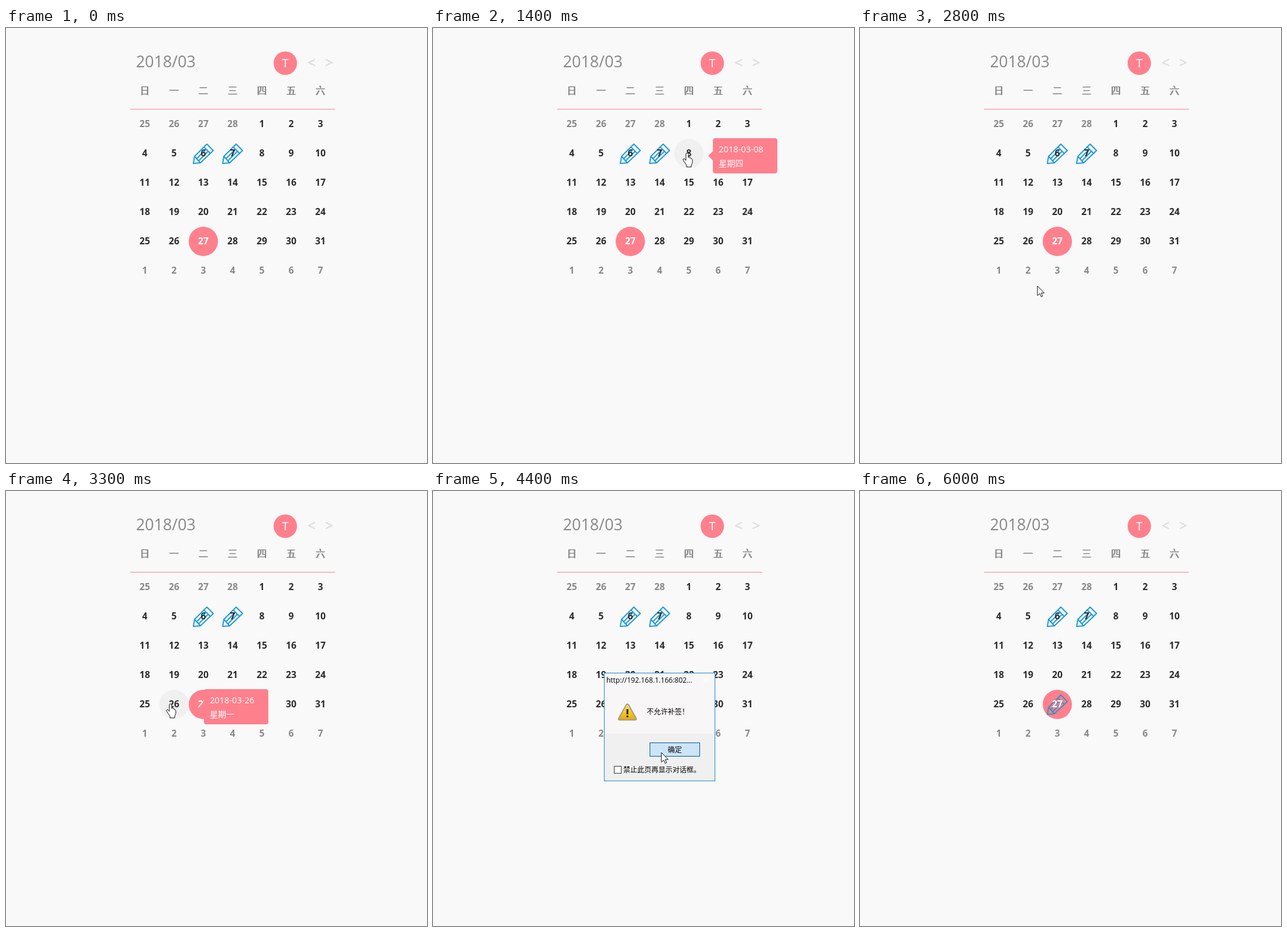
Recreate the animation shown at these times as an HTML page with a canvas. Size 719 by 742 pixels, loop 9.5 s.

```html
<!DOCTYPE html>
<html lang="zh">
<head>
<meta charset="utf-8">
<style>
html, body { margin: 0; width: 100%; height: 100%; overflow: hidden; background: #f9f9f9; }
canvas { display: block; }
</style>
</head>
<body>
<canvas id="stage" width="719" height="742"></canvas>
<script>
const ctx = document.getElementById('stage').getContext('2d');
const LOOP = 9500, STEP = 100;
const PINK = '#ff808d', GREY = '#888', DARK = '#2d2a2a';
const LATIN = '"Open Sans", "Noto Sans CJK SC", sans-serif';
const CJK = '"Noto Sans CJK SC", "Noto Sans CJK", sans-serif';
const DAYS = '日一二三四五六';
const TODAY = 30;

// Pointer path: time, x, y
const PATH = [
  [500, 694, 324], [800, 500, 272], [900, 445, 255], [1000, 428, 181],
  [1400, 434, 213], [1500, 434, 213], [1700, 430, 330], [1800, 430, 330],
  [2200, 408, 457], [2400, 408, 457], [2800, 303, 440], [3000, 285, 410],
  [3300, 281, 363], [3800, 283, 364], [4300, 390, 446], [4500, 390, 446],
  [4600, 355, 300], [4700, 362, 217], [4800, 355, 340], [5200, 351, 359],
  [5500, 351, 359], [5600, 400, 365], [5700, 490, 355], [5900, 708, 207]
];

// Hovered cells: from, to, cell index
const HOVERS = [
  [800, 900, 18], [900, 1000, 18 - 1], [1000, 2400, 11], [2900, 3200, 36],
  [3200, 4400, 29], [4800, 5600, TODAY], [5600, 5700, 31], [5700, 5800, 33]
];

const HAND = new Path2D('M-2 13V2q0-2 2-2t2 2v6q0-1 1.2-1t1.2 1v1q.2-.8 1.2-.7t1.2 1.2v1q.2-.5 1-.3t1.2 1.5v5l-2 4.3v3h-8v-3l-5.5-8q-1.2-2.5 .5-3t3 2z');
const ARROW = new Path2D('M0 0V16.5l4-3.5 2.5 5.5 2.4-1-2.4-5.5h5.2z');
const PENCIL = new Path2D('M-17 17l2-12L6-16 17-5-5 16zM-15 5L-5 16M1-11L12 0M-11.5 9L4.5-7M-8 12.5L8.5-4');
const TRIANGLE = new Path2D('M14.2 1.5q1.8-2 3.6 0L31 25q1 2.5-2 2.5H3q-3 0-2-2.5z');

function text(str, x, y, size, color, { align = 'left', weight = 400, family = LATIN } = {}) {
  ctx.font = `${weight} ${size}px ${family}`;
  ctx.textAlign = align;
  ctx.fillStyle = color;
  ctx.fillText(str, x, y);
}

function rect(x, y, w, h, fill, stroke, line = 1) {
  ctx.fillStyle = fill;
  ctx.fillRect(x, y, w, h);
  if (!stroke) return;
  ctx.strokeStyle = stroke;
  ctx.lineWidth = line;
  ctx.strokeRect(x + line / 2, y + line / 2, w - line, h - line);
}

function disc(x, y, r, fill) {
  ctx.fillStyle = fill;
  ctx.beginPath();
  ctx.arc(x, y, r, 0, Math.PI * 2);
  ctx.fill();
}

function shape(path, x, y, fill, stroke, line = 1) {
  ctx.save();
  ctx.translate(x, y);
  ctx.lineWidth = line;
  ctx.lineJoin = 'round';
  ctx.fillStyle = fill;
  ctx.strokeStyle = stroke;
  if (fill) ctx.fill(path);
  ctx.stroke(path);
  ctx.restore();
}

const center = i => [237 + i % 7 * 50, 164 + Math.floor(i / 7) * 50];
const dateOf = i => new Date(2018, 1, 25 + i);

function drawHeader() {
  text('2018/03', 222, 67, 26.8, GREY);
  disc(477, 60, 20, PINK);
  text('T', 477, 67, 20, '#fff', { align: 'center' });
  for (const [sign, x] of [['<', 522], ['>', 552]])
    text(sign, x, 67.5, 25, '#ddd', { align: 'center', weight: 600 });
  [...DAYS].forEach((day, i) => {
    // Doubled glyphs thicken only the vertical strokes
    for (const dx of [-.4, .4])
      text(day, 237 + i * 50 + dx, 113, 16.5, GREY, { align: 'center', family: CJK });
  });
  rect(212, 138, 350, 1, PINK);
}

function drawCells(t, hovered) {
  for (let i = 0; i < 42; i++) {
    const [x, y] = center(i), date = dateOf(i);
    if (i === TODAY) disc(x, y, 25, PINK);
    else if (i === hovered) disc(x, y, 25, '#f0f0f0');
    if (i === 9 || i === 10 || (i === TODAY && t >= 5100))
      shape(PENCIL, x, y, null, i === TODAY ? '#3f8fbf' : '#1e9ada', 2);
    const color = i === TODAY ? '#fff' : date.getMonth() === 2 ? DARK : GREY;
    text(date.getDate(), x, y + 5, 15.7, color, { align: 'center', weight: 700 });
  }
}

function drawTooltip(i, age) {
  const [cx, cy] = center(i), date = dateOf(i);
  const x = cx + 41 + Math.round(Math.max(0, 14 - age * .035) - .01), y = cy - 26;
  ctx.fillStyle = PINK;
  ctx.beginPath();
  ctx.roundRect(x, y, 110, 60, 4);
  ctx.moveTo(x, y + 22);
  ctx.lineTo(x - 8, y + 30);
  ctx.lineTo(x, y + 38);
  ctx.fill();
  const two = n => String(n).padStart(2, '0');
  text(`2018-${two(date.getMonth() + 1)}-${two(date.getDate())}`, x + 10, y + 24, 14.6, '#fff');
  text('星期' + DAYS[i % 7], x + 10, y + 48, 14, '#fff', { family: CJK });
}

function drawWarning(x, y) {
  const gold = ctx.createLinearGradient(0, 0, 0, 28);
  gold.addColorStop(0, '#ffe95a');
  gold.addColorStop(1, '#e9a800');
  shape(TRIANGLE, x, y, gold, '#a09a8c', 2);
  rect(x + 14.5, y + 9, 3, 9, '#222');
  rect(x + 14.5, y + 20, 3, 3, '#222');
}

function drawDialog(x, y, w, h, title, { again = false, pressed = false } = {}) {
  rect(x, y, w, h, pressed ? '#f9f6f7' : '#fff');
  rect(x, y + 104, w, h - 104, '#f0f0f0');
  ctx.strokeStyle = '#1f86d2';
  ctx.lineWidth = 1;
  ctx.strokeRect(x + .5, y + .5, w - 1, h - 1);
  text(title, x + 4, y + 17, 12, '#000');

  const cx = x + w - 16, cy = y + 13;
  ctx.strokeStyle = pressed ? '#fff' : '#000';
  ctx.lineWidth = 1.2;
  ctx.beginPath();
  for (const d of [-5, 5]) {
    ctx.moveTo(cx - 5, cy - d);
    ctx.lineTo(cx + 5, cy + d);
  }
  ctx.stroke();

  drawWarning(x + 24, y + 53);
  text('不允许补签！', x + 73, y + 71, 12, '#000', { family: CJK });
  rect(x + 78, y + 119, 86, 24, pressed ? '#cce4f7' : '#e1e5e9',
    pressed ? '#00559b' : '#0078d7', pressed ? 1 : 2);
  text('确定', x + 121, y + 135.5, 12, '#000', { align: 'center', family: CJK });
  if (again) {
    rect(x + 17, y + 159, 13, 13, '#fff', '#333');
    text('禁止此页再显示对话框。', x + 33, y + 170, 12, '#000', { family: CJK });
  }
}

function pointerAt(t) {
  const k = PATH.findIndex(p => p[0] >= t);
  if (k <= 0) return PATH[0].slice(1);
  const [t0, x0, y0] = PATH[k - 1], [t1, x1, y1] = PATH[k];
  const p = (t - t0) / (t1 - t0);
  return [Math.round(x0 + (x1 - x0) * p), Math.round(y0 + (y1 - y0) * p)];
}

function draw(t) {
  const hover = HOVERS.find(([from, to]) => t >= from && t < to);
  const first = t >= 1500 && t < 2400, second = t >= 3500 && t < 4500;
  rect(0, 0, 719, 742, '#f9f9f9');
  drawHeader();
  drawCells(t, hover && hover[2]);
  if (hover) drawTooltip(hover[2], t - hover[0]);
  if (first) drawDialog(296, 324, 182, 157, 'http://192.168.1.166:80...');
  if (second) drawDialog(292, 310, 190, 185, 'http://192.168.1.166:802...', { again: true, pressed: t >= 4400 });
  if (t >= 500 && t < 6000) {
    const [x, y] = pointerAt(t);
    shape(hover && !first && !second ? HAND : ARROW, x, y, '#fff', '#111');
  }
}

function frame() {
  draw(Math.floor(performance.now() % LOOP / STEP) * STEP);
  requestAnimationFrame(frame);
}
frame();
</script>
</body>
</html>
```
